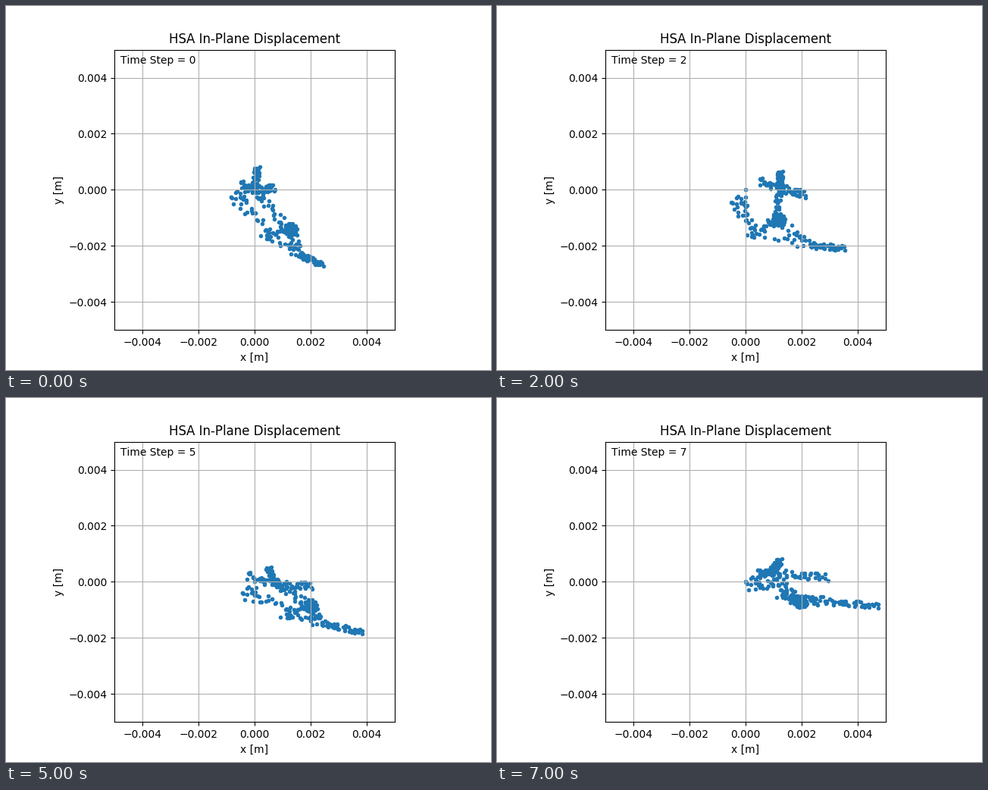
A matplotlib script that plays this animation: 640 by 480 pixels, repeating every 8 s.

```python
import numpy as np
import matplotlib.pyplot as plt
from matplotlib.animation import FuncAnimation

STEPS = 8
ORIGIN = np.array([328, 242.4])   # stage pixel of data point (0, 0)
PX = 0.01 / 369.6                 # data units per stage pixel

# Paths of the key points in stage pixels; other steps are interpolated.
KEY_STEPS = [0, 1, 2, 4, 5, 7]
PATHS = {
    "peak": [(332, 214), (378, 223), (374, 220), (374, 217), (346, 225), (373, 215)],
    "head": [(327, 243), (368, 238), (373, 240), (369, 235), (358, 246), (362, 230)],
    "arm": [(311, 235), (351, 236), (347, 231), (345, 230), (318, 234), (344, 231)],
    "side": [(353, 240), (384, 249), (406, 249), (400, 245), (403, 248), (436, 237)],
    "left": [(304, 251), (318, 256), (317, 258), (320, 256), (319, 256), (336, 243)],
    "mid": [(343, 300), (340, 300), (335, 298), (354, 290), (370, 283), (376, 256)],
    "bulge": [(376, 294), (381, 284), (372, 281), (388, 280), (402, 273), (400, 268)],
    "base": [(386, 327), (382, 327), (412, 315), (402, 309), (414, 296), (430, 268)],
    "tip": [(417, 341), (433, 339), (458, 319), (449, 320), (470, 309), (504, 274)],
}

# Strands of points: from key, to key, count, scatter radius.
STRANDS = [
    ("peak", "head", 40, 5), ("arm", "head", 30, 5), ("head", "side", 38, 5),
    ("left", "left", 12, 15), ("left", "mid", 18, 9), ("head", "bulge", 26, 7),
    ("mid", "bulge", 26, 8), ("bulge", "bulge", 32, 9), ("bulge", "base", 18, 8),
    ("mid", "base", 14, 8), ("base", "tip", 38, 5),
]

rng = np.random.default_rng(7)


def make_cloud(count, radius):
    """Place of each point along its strand and its offset from it."""
    along = (np.arange(count) + rng.random(count)) / count
    angle = rng.uniform(0, 2 * np.pi, count)
    reach = radius * np.sqrt(rng.random(count))
    return along[:, None], reach[:, None] * np.c_[np.cos(angle), np.sin(angle)]


clouds = [make_cloud(count, radius) for _, _, count, radius in STRANDS]


def key(name, step):
    return np.array([np.interp(step, KEY_STEPS, path) for path in zip(*PATHS[name])])


def points(step):
    parts = [ORIGIN[None]]
    for (a, b, _, _), (along, offset) in zip(STRANDS, clouds):
        start, end = key(a, step), key(b, step)
        parts.append(start + along * (end - start) + offset)
    return (np.vstack(parts) - ORIGIN) * (PX, -PX)


plt.rcParams["text.kerning_factor"] = 6   # whole-pixel kerning
fig, ax = plt.subplots(figsize=(6.4, 4.8), dpi=100)
ax.set_aspect("equal")
ax.set_xlim(-0.005, 0.005)
ax.set_ylim(-0.005, 0.005)
ax.set_xlabel("x [m]")
ax.set_ylabel("y [m]")
ax.set_title("HSA In-Plane Displacement")
ax.grid(True)
dots = ax.scatter(*points(0).T, s=10, linewidths=0.8, color="tab:blue")
label = ax.text(0.02, 0.95, "", transform=ax.transAxes)


def update(step):
    dots.set_offsets(points(step))
    label.set_text(f"Time Step = {step}")
    return dots, label


anim = FuncAnimation(fig, update, frames=STEPS, interval=1000, repeat=True, repeat_delay=0)
plt.show()
```
